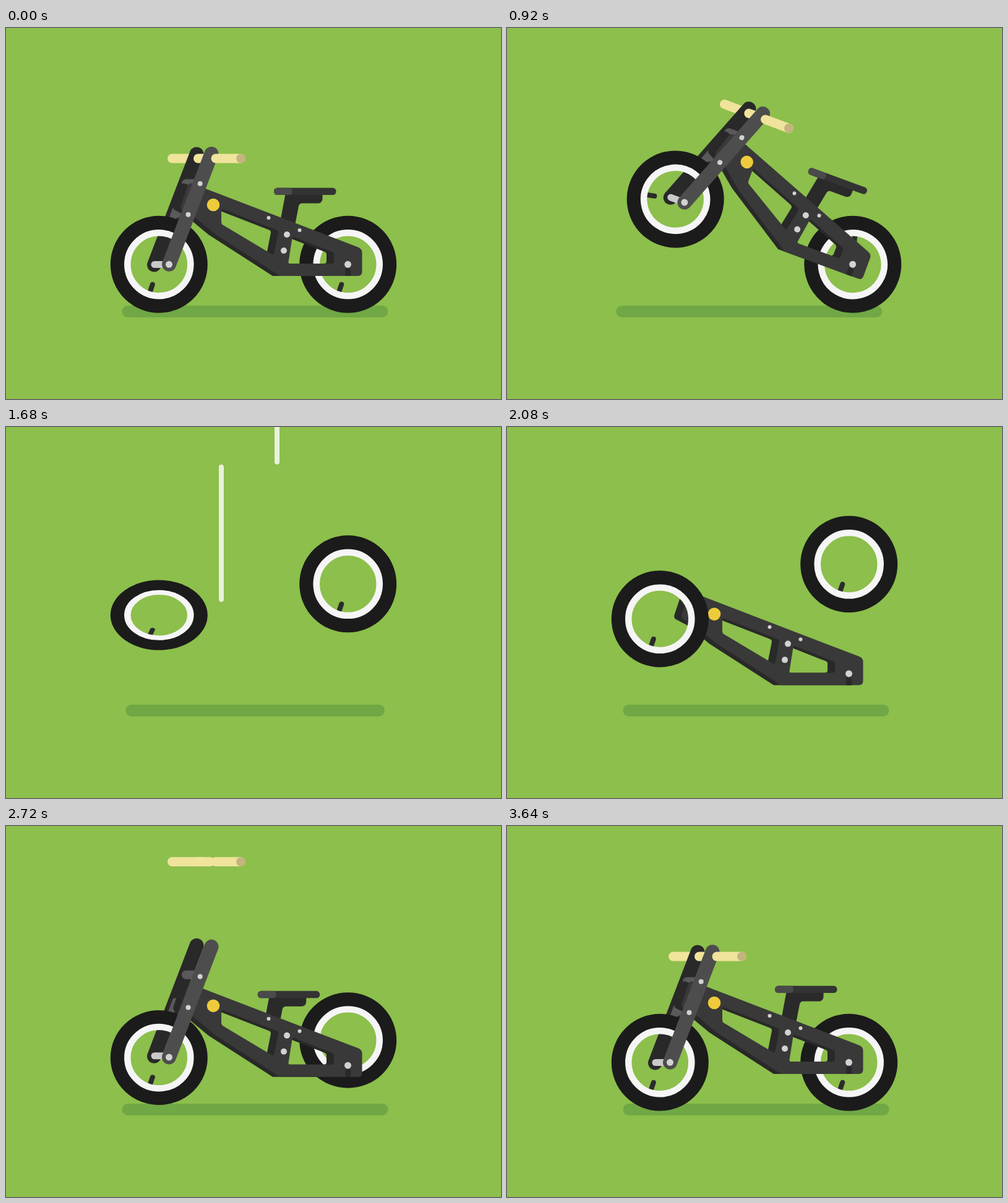
An HTML page for the animation above (3760 ms loop, 800x600 px).

```html
<!DOCTYPE html>
<html lang="en">
<head>
<meta charset="utf-8">
<title>Balance bike</title>
<style>
html, body { margin: 0; width: 100%; height: 100%; overflow: hidden; background: #8cbf4b; }
svg { display: block; width: 800px; height: 600px; }
.round { stroke-linecap: round; fill: none; }
.bolt { fill: #d2d2d2; }
</style>
</head>
<body>
<svg viewBox="0 0 800 600">
  <defs>
    <g id="wheel">
      <path class="round" d="M-10.5 32.5L-16 49" stroke="#2b2b2b" stroke-width="8"/>
      <circle r="67" fill="none" stroke="#1b1b1b" stroke-width="23"/>
      <circle r="51" fill="none" stroke="#f5f5f5" stroke-width="10.5"/>
    </g>
    <path id="plate" fill-rule="evenodd" d="M302 252L569 354.500Q575.500 357 575.500 363V394Q575.500 401 568.500 401H443L339 334L303 304L284 294Q281 291 283 286L293 256Q296 249.500 302 252Z
      M348 294V314Q348 317 350.500 318.500L430 366Q433 367.500 433.500 364L440 331Q440.500 328 437 326.500L351 293Q348 292 348 294Z
      M466 338Q463 337 462.500 340L456.500 378Q456 381 459.500 381H526Q530 381 530 377V366Q530 363 527 362Z"/>
    <clipPath id="above"><path d="M-100-400H900V492L-100 107Z"/></clipPath>
  </defs>
  <rect width="800" height="600" fill="#8cbf4b"/>
  <rect id="shadow" y="449" height="19" rx="9.500" fill="#70a845"/>
  <g id="streaks" class="round" stroke="#e9f2da" stroke-width="8"></g>
  <g id="scene">
    <path id="barBack" class="round" d="M268.500 211H316" stroke="#f0e39c" stroke-width="15"/>
    <g id="forkBack">
      <path class="round" d="M308 204L239.500 383" stroke="#292929" stroke-width="23"/>
      <rect x="284" y="244.500" width="38" height="14" rx="7" fill="#5a5a5a"/>
      <path d="M273 289H305Q309 289 307.500 293L304 302Q302.500 306 298 306H281Q275 306 271 313L262.500 310L269 292Q270 289 273 289Z" fill="#5a5a5a"/>
      <rect x="234.500" y="377" width="40" height="11" rx="5.500" fill="#c9c9c9"/>
    </g>
    <use id="rear" href="#wheel"/>
    <g id="seatBox" clip-path="url(#above)">
      <g id="seat">
        <path d="M452 266H511.500V275Q511.500 283.500 503 283.500H479Q474 283.500 473 288L463 340H438Z" fill="#2a2a2a"/>
        <rect x="433" y="258.500" width="100.500" height="11.500" rx="5.500" fill="#333"/>
        <rect x="433" y="258.500" width="30" height="11.500" rx="5.500" fill="#4a4a4a"/>
      </g>
    </g>
    <g id="frame">
      <use href="#plate" x="-12" fill="#292929"/>
      <use href="#plate" fill="#393939"/>
      <path d="M548 401V390Q552.500 386 557 390V401Z" fill="#292929"/>
      <circle cx="335" cy="286" r="10.300" fill="#eecb3c"/>
      <g class="bolt">
        <circle cx="454" cy="334" r="5"/>
        <circle cx="449" cy="360" r="5"/>
        <circle cx="424.500" cy="307" r="3"/>
        <circle cx="474.500" cy="327" r="3"/>
        <circle cx="552.500" cy="382.300" r="5.500"/>
      </g>
    </g>
    <use id="front" href="#wheel"/>
    <path id="barMid" class="round" d="M310.500 211H330" stroke="#f0e39c" stroke-width="15"/>
    <g id="forkNear">
      <path class="round" d="M332 203.500L263.500 382.300" stroke="#4d4d4d" stroke-width="23"/>
      <g class="bolt">
        <circle cx="313.700" cy="251.800" r="4"/>
        <circle cx="294.500" cy="301.800" r="4"/>
        <circle cx="263.500" cy="382.300" r="5.500"/>
      </g>
    </g>
    <g id="barNear">
      <path class="round" d="M339 211H379.500" stroke="#f0e39c" stroke-width="15"/>
      <circle cx="379.500" cy="211" r="7.500" fill="#c4b47e"/>
    </g>
  </g>
</svg>
<script>
const LOOP = 3760, STEP = 40, REBUILD = 1400;
const AXLE = { x: 552.7, y: 382.3 }, RADIUS = 78.5, BASE = 305.4;
const GROUND = AXLE.y + RADIUS, BOUNCE = 0.694;
const BARS = ['barBack', 'barMid', 'barNear'];

const el = id => document.getElementById(id);
const put = (id, value) => el(id).setAttribute('transform', value);
const place = (ids, value) => ids.forEach(id => put(id, value));
const move = (x, y) => `translate(${x} ${y})`;

const clamp = u => Math.min(1, Math.max(0, u));
const part = (t, from, to) => clamp((t - from) / (to - from));
const smooth = u => u * u * (3 - 2 * u);

// Height left in an accelerating fall that ends at time hit.
const fall = (t, hit, height, span) => height * (1 - part(t, hit - span, hit) ** 2);

// Fall, then ever smaller hops; dent is the squash left from the last hit.
function hop(t, hit, height, span, peak, gap) {
  if (t < hit) return { up: fall(t, hit, height, span), dent: 0 };
  let age = t - hit, size = 1;
  while (age > gap) {
    age -= gap;
    gap *= BOUNCE;
    size *= BOUNCE;
    if (gap < 20) return { up: 0, dent: 0 };
  }
  const u = age / gap;
  return { up: 4 * peak * size * size * u * (1 - u), dent: size * Math.exp(-age / 100) };
}

// Fall into place, then ring like a spring.
function settle(t, hit) {
  const age = t - hit;
  if (age < 0) return -fall(t, hit, 480, 200);
  return 21 * Math.sin(2 * Math.PI * age / 310) * Math.exp(-age / 350);
}

// x, start time, y where the streak ends
const STREAKS = [[348, 1551.5, 420], [438, 1652.5, 420], [538, 2197, 360], [438, 2385, 330]];
const lines = STREAKS.map(() => {
  const p = document.createElementNS('http://www.w3.org/2000/svg', 'path');
  return el('streaks').appendChild(p);
});

function drawStreaks(t) {
  STREAKS.forEach(([x, start, end], n) => {
    const run = (t - start) * 2.2;
    const tip = Math.min(run, end) - 4, tail = Math.min(run - 222, end) + 4;
    lines[n].setAttribute('d', t > start && tip > tail ? `M${x} ${tail}V${tip}` : '');
  });
}

function drawShadow(shift, half) {
  el('shadow').setAttribute('x', 402.5 + shift - half);
  el('shadow').setAttribute('width', half * 2);
}

// Lean back into a wheelie, then race off to the left.
function drawRide(t) {
  const run = Math.max(0, (t - 160) / 640), push = clamp(run);
  const back = smooth(part(t, 800, 1200));
  const tilt = 22.3 * smooth(push ** 1.6) - 9.8 * back;
  const lean = 20.5 * smooth(push) - 14.5 * back;
  const sink = 9 * Math.sin(Math.PI * push);
  const shift = -234 * Math.max(0, (t - 760) / 440) ** 3;
  const dx = lean + 0.3 * sink, rad = tilt * Math.PI / 180;
  const body = `${move(dx, sink)} rotate(${tilt} ${AXLE.x} ${AXLE.y})`;

  drawShadow(shift, 215);
  put('scene', move(shift, 0));
  place(['frame', 'seatBox'], body);
  put('seat', '');
  place([...BARS, 'forkBack', 'forkNear'], `${body} rotate(${1.3 * back} 313 252)`);
  put('rear', `${move(AXLE.x + lean, AXLE.y)} rotate(${-135.6 * run ** 2.08})`);
  const x = AXLE.x + dx - BASE * Math.cos(rad), y = AXLE.y + sink - BASE * Math.sin(rad);
  put('front', `${move(x, y)} rotate(${62 * run ** 1.54})`);
}

function drawWheel(id, x, { up, dent }, give) {
  const flat = 1 - give * dent;
  put(id, `${move(x, GROUND - up - RADIUS * flat)} scale(1 ${flat})`);
}

// Parts drop in one after another and come to rest as the bike.
function drawBuild(t) {
  const calm = 1 - smooth(part(t, 3000, 3600));
  const frame = (settle(t, 1975) + 3.4) * calm;
  const late = t - 2440;

  drawShadow(0, 9.5 + 205.5 * (1 - (1 - part(t, REBUILD, 1736)) ** 2));
  put('scene', '');
  drawWheel('front', AXLE.x - BASE, hop(t, 1612, 480, 200, 218, 515), 0.55);
  drawWheel('rear', AXLE.x, hop(t, 1712, 580, 272, 215, 490), 0.2);
  place(['frame', 'seatBox'], move(0, frame));
  put('seat', move(-46 * Math.exp(-late / 500) * calm, 24 * Math.exp(-late / 145) * calm));
  put('forkNear', move(0, settle(t, 2459) * calm));
  put('forkBack', move(0, settle(t, 2486) * calm));
  place(BARS, move(0, settle(t, 2755) * calm));
}

function draw(ms) {
  const t = Math.floor((ms % LOOP) / STEP) * STEP;
  drawStreaks(t);
  if (t < REBUILD) drawRide(t);
  else drawBuild(t);
}

const begin = performance.now();
function tick() {
  draw(performance.now() - begin);
  requestAnimationFrame(tick);
}
tick();
</script>
</body>
</html>
```
